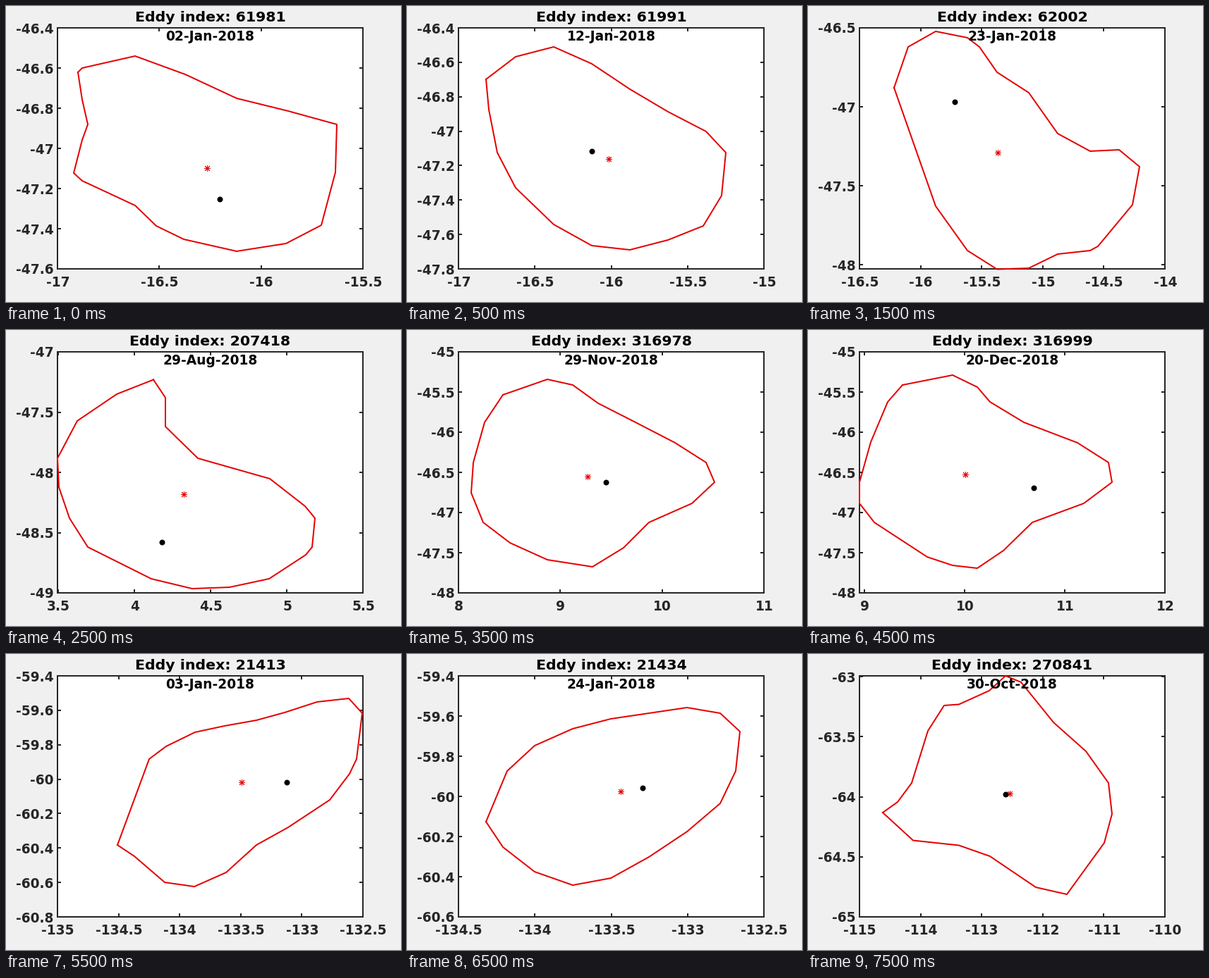
Recreate the animation shown at these times as a matplotlib script. Size 560x420 px, loop 8 s.

```python
import math

import numpy as np
import matplotlib.pyplot as plt
from matplotlib.animation import FuncAnimation

W, H, DPI = 560, 420, 100
PX = 72 / DPI                      # one pixel in points
LEFT, RIGHT, TOP, BOTTOM = 73, 506, 31, 373
INK, RED = "#262626", "#e60000"

plt.rcParams["font.family"] = "DejaVu Sans"
plt.rcParams["font.weight"] = "bold"

# Axis ranges are (low, high, tick step); outlines and markers are stage pixels.
EDDIES = [
    dict(index=61981, date="02-Jan-2018", x=(-17, -15.5, .5), y=(-47.6, -46.4, .2),
         star=(284.5, 229.5), dot=(303, 274),
         outline=[(102, 94), (108, 88), (183, 71), (254, 97), (327, 131),
                  (400, 149), (469, 168), (467, 236), (447, 311), (397, 337),
                  (327, 348), (252, 331), (213, 312), (183, 283), (108, 248),
                  (96, 237), (108, 190), (116, 168), (108, 133)]),
    dict(index=61991, date="12-Jan-2018", x=(-17, -15, .5), y=(-47.8, -46.4, .2),
         star=(285.5, 216.5), dot=(262, 206),
         outline=[(112, 104), (154, 72), (208, 58), (262, 82), (316, 118),
                  (370, 150), (424, 178), (452, 208), (446, 269), (420, 312),
                  (370, 332), (316, 346), (262, 340), (208, 310), (154, 258),
                  (128, 208), (116, 147)]),
    dict(index=62002, date="23-Jan-2018", x=(-16.5, -14, .5), y=(-48.025, -46.5, .5),
         star=(268.5, 207.5), dot=(207.5, 136),
         outline=[(122, 116), (142, 58), (181, 36), (226, 45), (243, 58),
                  (268, 94), (313, 123), (354, 181), (400, 206), (441, 204),
                  (470, 228), (460, 282), (411, 341), (400, 347), (354, 352),
                  (313, 372), (268, 373.5), (226, 347), (181, 284)]),
    dict(index=207418, date="29-Aug-2018", x=(3.495, 5.5, .5), y=(-49, -47, .5),
         star=(251.5, 232.5), dot=(220.5, 300.5),
         outline=[(209, 70.5), (226, 96), (226, 137), (272, 182), (374, 211),
                  (424, 250), (438, 267), (434, 308), (425, 319), (373, 353),
                  (317, 365), (264, 367), (206, 353), (116, 308), (90, 267),
                  (75, 223), (73, 182), (101, 129), (157, 91)]),
    dict(index=316978, date="29-Nov-2018", x=(8, 11, 1), y=(-48, -45, .5),
         star=(255.5, 207.5), dot=(282, 216),
         outline=[(136, 92), (199, 70), (235, 78), (271, 104), (324, 131),
                  (380, 160), (424, 188), (436, 216), (404, 246), (343, 273),
                  (307, 309), (263, 336), (199, 326), (146, 302), (108, 273),
                  (91, 231), (94, 188), (110, 131)]),
    dict(index=316999, date="20-Dec-2018", x=(8.95, 12, 1), y=(-48, -45, .5),
         star=(222.5, 204.5), dot=(319.5, 223.5),
         outline=[(134, 78), (205, 64), (240, 81), (258, 102), (306, 131),
                  (382, 160), (426, 188), (431, 216), (391, 246), (318, 273),
                  (277, 313), (240, 338), (205, 334), (169, 322), (94, 273),
                  (73, 246), (73, 216), (89, 159), (113, 102)]),
    dict(index=21413, date="03-Jan-2018", x=(-135, -132.5, .5), y=(-60.8, -59.4, .2),
         star=(333.5, 182), dot=(398, 181.5),
         outline=[(158, 271), (203, 149), (227, 131), (268, 111), (310, 102),
                  (355, 94), (395, 83), (441, 68), (486, 63), (505, 84),
                  (497, 149), (487, 170), (459, 207), (400, 246), (355, 271),
                  (312, 310), (267, 330), (225, 324), (182, 287)]),
    dict(index=21434, date="24-Jan-2018", x=(-134.5, -132.5, .5), y=(-60.6, -59.4, .2),
         star=(302.5, 194.5), dot=(334, 190),
         outline=[(112, 238), (142, 166), (181, 130), (235, 106), (289, 92),
                  (343, 84), (397, 76), (444, 84), (472, 110), (466, 166),
                  (444, 212), (397, 252), (343, 288), (289, 318), (235, 328),
                  (181, 309), (136, 274)]),
    dict(index=270841, date="30-Oct-2018", x=(-115, -110, 1), y=(-65, -62.994, .5),
         star=(285.5, 197.5), dot=(279.5, 199),
         outline=[(106, 225), (127, 210), (147, 183), (170, 109), (193, 73),
                  (214, 71.5), (257, 52), (280, 31), (302, 40), (348, 97),
                  (394, 138), (426, 183), (431, 227), (420, 268), (367, 341),
                  (323, 331), (258, 287), (214, 271.5), (149, 264.5)]),
]

fig = plt.figure(figsize=(W / DPI, H / DPI), dpi=DPI, facecolor="#f0f0f0")
ax = fig.add_axes([0, 0, 1, 1])


def line(xs, ys, color=INK, width=2, **kw):
    ax.plot(xs, ys, color=color, lw=width * PX, **kw)


def label(x, y, text, size=18.67, color="black", ha="center"):
    ax.text(x, y, text, fontsize=size * PX, color=color, ha=ha, va="baseline", zorder=5)


def ticks(axis, start, end):
    """Yield (pixel, text) for each tick of an axis running start -> end."""
    low, high, step = axis
    first = math.ceil(low / step - 1e-6)
    last = math.floor(high / step + 1e-6)
    for k in range(first, last + 1):
        value = k * step
        yield start + (value - low) / (high - low) * (end - start), f"{round(value, 4):g}"


def draw_frame(eddy):
    ax.fill([LEFT, RIGHT, RIGHT, LEFT], [TOP, TOP, BOTTOM, BOTTOM], color="white", lw=0)
    line([LEFT, RIGHT, RIGHT, LEFT, LEFT], [TOP, TOP, BOTTOM, BOTTOM, TOP],
         solid_joinstyle="miter", solid_capstyle="projecting")
    for x, text in ticks(eddy["x"], LEFT, RIGHT):
        line([x, x], [BOTTOM, BOTTOM - 5], solid_capstyle="butt")
        line([x, x], [TOP, TOP + 5], solid_capstyle="butt")
        label(x + .5, 398, text, color=INK)
    for y, text in ticks(eddy["y"], BOTTOM, TOP):
        line([LEFT, LEFT + 5], [y, y], solid_capstyle="butt")
        line([RIGHT, RIGHT - 5], [y, y], solid_capstyle="butt")
        label(67.5, y + 7.5, text, color=INK, ha="right")


def draw(i):
    eddy = EDDIES[(i + 1) // 2]
    ax.clear()
    ax.axis("off")
    ax.set_xlim(0, W)
    ax.set_ylim(H, 0)
    draw_frame(eddy)
    pts = np.array(eddy["outline"] + eddy["outline"][:1])
    line(pts[:, 0], pts[:, 1], RED, zorder=3, solid_joinstyle="round")
    ax.plot(*eddy["star"], marker=(8, 2, 0), ms=9 * PX, mew=PX, color=RED, zorder=4)
    ax.plot(*eddy["dot"], marker="o", ms=8 * PX, mew=0, color="black", zorder=4)
    label(289.5, 22, f"Eddy index: {eddy['index']}", size=20.5)
    label(289.5, 49, eddy["date"])
    return []


anim = FuncAnimation(fig, draw, frames=16, interval=500, repeat=True, repeat_delay=0)
plt.show()
```
